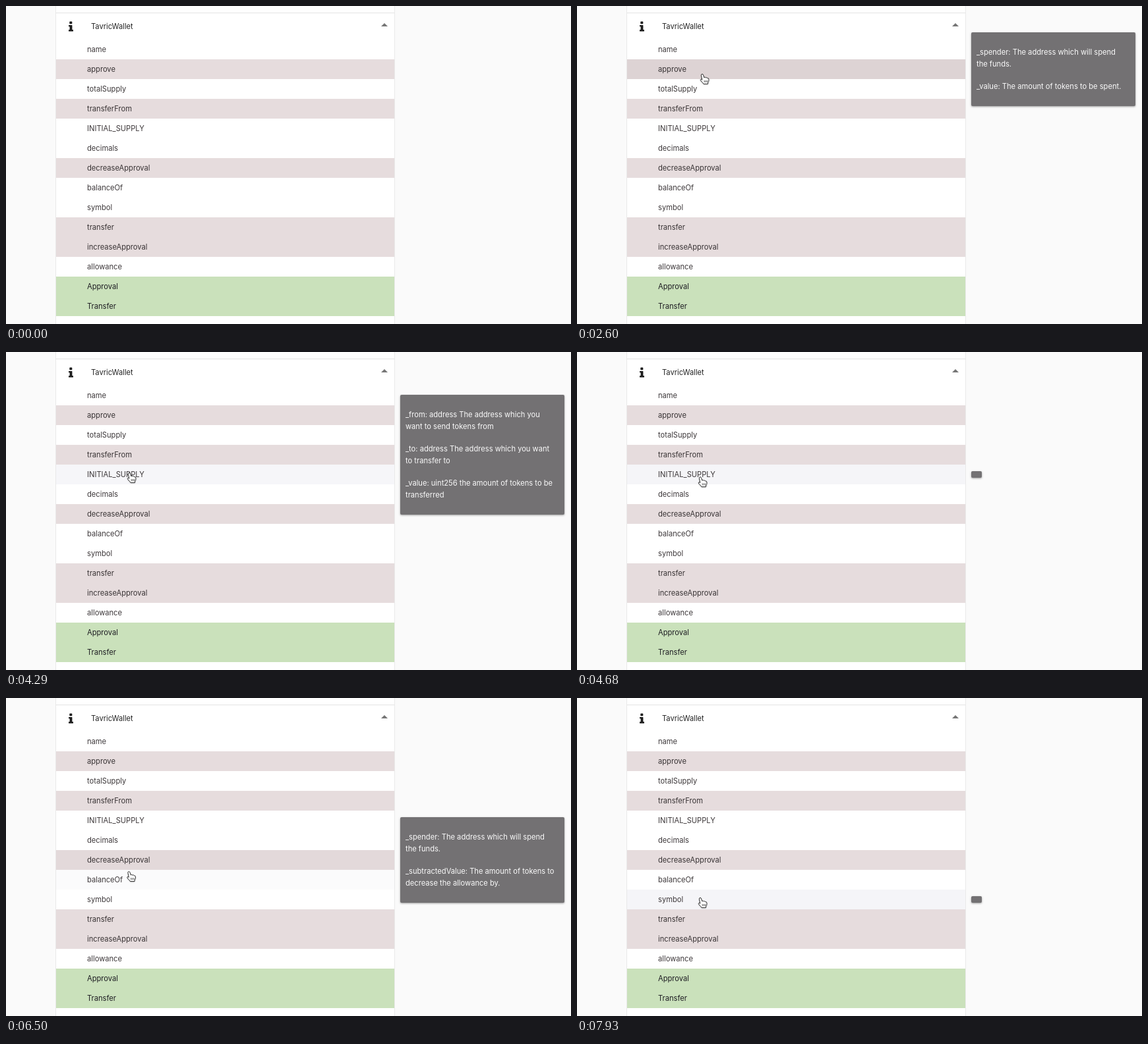
Recreate the animation shown at these times as an HTML page with a canvas. Size 857 by 483 pixels, loop 8 s.

```html
<!DOCTYPE html>
<html lang="en">
<head>
<meta charset="utf-8">
<title>Contract methods</title>
<style>
  html, body { margin: 0; width: 100%; height: 100%; overflow: hidden; background: #fafafa; }
  canvas { display: block; width: 857px; height: 483px; filter: blur(.35px); }
</style>
</head>
<body>
<canvas id="stage"></canvas>
<script>
const W = 857, H = 483, LOOP = 8000;
const LEFT = 76, RIGHT = 589, FIRST_ROW = 51, ROW_H = 30;
const FONT = '11.15px Inter, Arial, sans-serif';

const canvas = document.getElementById('stage');
const ctx = canvas.getContext('2d');
const dpr = window.devicePixelRatio || 1;
canvas.width = W * dpr;
canvas.height = H * dpr;

const KINDS = {
  read:  { fill: [255, 255, 255], hover: [245, 245, 248], text: '#3d383a' },
  write: { fill: [230, 220, 221], hover: [221, 211, 212], text: '#383334' },
  event: { fill: [202, 225, 187], hover: [202, 225, 187], text: '#1d1c22' }
};

// Each tip is a list of paragraphs, each paragraph a list of lines.
const SPENDER = ['_spender: The address which will spend', 'the funds.'];
const rows = [
  { name: 'name', kind: 'read', from: 850 },
  { name: 'approve', kind: 'write', from: 1660,
    tip: [SPENDER, ['_value: The amount of tokens to be spent.']] },
  { name: 'totalSupply', kind: 'read', from: 2860, tip: [] },
  { name: 'transferFrom', kind: 'write', from: 3310,
    tip: [['_from: address The address which you', 'want to send tokens from'],
          ['_to: address The address which you want', 'to transfer to'],
          ['_value: uint256 the amount of tokens to be', 'transferred']] },
  { name: 'INITIAL_SUPPLY', kind: 'read', from: 4180 },
  { name: 'decimals', kind: 'read', from: 4940 },
  { name: 'decreaseApproval', kind: 'write', from: 5660,
    tip: [SPENDER, ['_subtractedValue: The amount of tokens to', 'decrease the allowance by.']] },
  { name: 'balanceOf', kind: 'read', from: 6450,
    tip: [['_owner: The address to query the the', 'balance of.'],
          ['Returns: An uint256 representing the', 'amount owned by the passed address.']] },
  { name: 'symbol', kind: 'read', from: 7380 },
  { name: 'transfer', kind: 'write' },
  { name: 'increaseApproval', kind: 'write' },
  { name: 'allowance', kind: 'read' },
  { name: 'Approval', kind: 'event' },
  { name: 'Transfer', kind: 'event' }
];

// Pointer path: time, fingertip x, fingertip y.
const path = [
  [390, 190, -25], [910, 191, 57], [1300, 191, 62], [1430, 191, 62],
  [1820, 191, 97], [2600, 191, 103], [2990, 191, 123], [3200, 191, 128],
  [3380, 191, 153], [3950, 190, 161], [4290, 188, 183], [4650, 188, 189],
  [5050, 188, 213], [5460, 188, 215], [5850, 187, 243], [6250, 187, 250],
  [6760, 188, 277], [7150, 188, 277], [7800, 188, 303], [8000, 188, 303]
];

const clamp = v => Math.max(0, Math.min(1, v));
const ease = v => { v = clamp(v); return v * v * (3 - 2 * v); };
const mix = (a, b, k) => a + (b - a) * k;
const rgb = (a, b, k) => `rgb(${a.map((v, i) => Math.round(mix(v, b[i], k))).join(',')})`;

function box(x, y, w, h, color) {
  ctx.fillStyle = color;
  ctx.fillRect(x, y, w, h);
}

function label(text, x, y, color) {
  ctx.fillStyle = color;
  ctx.fillText(text, x, y);
}

function drawHeader() {
  box(LEFT, 0, RIGHT - LEFT, H, '#fff');
  box(LEFT, 10, RIGHT - LEFT, 1, '#e4e4e4');

  ctx.fillStyle = '#1c1c1c';
  ctx.beginPath();
  ctx.roundRect(96.3, 23.4, 4, 3.8, .8);
  ctx.roundRect(95, 29, 5.4, 2.3, .6);
  ctx.roundRect(96.6, 29, 3.8, 9, .4);
  ctx.roundRect(95, 36, 7, 2.5, .6);
  ctx.fill();

  label('TavricWallet', 129, 35, '#242424');

  ctx.fillStyle = '#757575';
  ctx.beginPath();
  ctx.moveTo(569, 31);
  ctx.lineTo(574, 26);
  ctx.lineTo(579, 31);
  ctx.fill();
}

function drawRow(row, i, t) {
  const kind = KINDS[row.kind], y = FIRST_ROW + i * ROW_H;
  const next = rows[i + 1]?.from ?? Infinity;
  const glow = row.from ? clamp((t - row.from) / 130) * (1 - clamp((t - next) / 80)) : 0;
  box(LEFT, y, RIGHT - LEFT, ROW_H, rgb(kind.fill, kind.hover, glow));
  label(row.name, 123, y + 19, kind.text);
}

function drawTip(row, i, t) {
  if (!row.from) return;
  const leave = (rows[i + 1].from ?? Infinity) + 200;
  const grow = ease((t - row.from - 250) / 150) * (1 - ease((t - leave) / 90));
  if (grow <= 0) return;

  const paragraphs = row.tip || [];
  const lines = paragraphs.flat().length;
  const w = lines ? 249 : 16;
  const h = lines ? 42 + lines * 18 + (paragraphs.length - 1) * 16 : row.tip ? 26 : 10;

  ctx.save();
  ctx.translate(598, FIRST_ROW + (i + .5) * ROW_H);
  ctx.scale(grow, grow);
  ctx.globalAlpha = grow;
  ctx.save();
  ctx.shadowColor = 'rgba(0,0,0,.38)';
  ctx.shadowBlur = 3 * dpr;
  ctx.shadowOffsetY = dpr;
  ctx.fillStyle = '#737173';
  ctx.beginPath();
  ctx.roundRect(0, -h / 2, w, h, 2);
  ctx.fill();
  ctx.restore();

  let y = -h / 2 + 33.5;
  for (const paragraph of paragraphs) {
    for (const line of paragraph) {
      label(line, 8, y, '#fafafa');
      y += 18;
    }
    y += 16;
  }
  ctx.restore();
}

function drawHand(t) {
  if (t < path[0][0]) return;
  const n = path.findIndex(p => p[0] > t);
  const a = path[n - 1], b = path[n];
  const k = ease((t - a[0]) / (b[0] - a[0]));

  ctx.save();
  ctx.translate(mix(a[1], b[1], k), mix(a[2], b[2], k));
  ctx.beginPath();
  ctx.moveTo(-1.2, 9.2);
  ctx.lineTo(-2.6, 2.2);
  ctx.quadraticCurveTo(-2.6, .4, -1, .4);
  ctx.quadraticCurveTo(.2, .4, .7, 2.2);
  ctx.lineTo(1.7, 5.6);
  ctx.quadraticCurveTo(3.4, 4.4, 4.4, 5.9);
  ctx.quadraticCurveTo(6, 5, 6.8, 6.6);
  ctx.quadraticCurveTo(8.8, 6.2, 9, 8.6);
  ctx.quadraticCurveTo(9.2, 11.3, 7.7, 13.4);
  ctx.lineTo(7.5, 15.4);
  ctx.lineTo(1, 15.4);
  ctx.quadraticCurveTo(0, 13.6, -2.8, 11);
  ctx.quadraticCurveTo(-4.4, 9.2, -3.3, 8.4);
  ctx.quadraticCurveTo(-2.4, 7.9, -1.2, 9.2);
  ctx.closePath();
  ctx.fillStyle = '#fff';
  ctx.strokeStyle = '#2a2a2a';
  ctx.lineWidth = 1;
  ctx.lineJoin = 'round';
  ctx.shadowColor = 'rgba(0,0,0,.25)';
  ctx.shadowBlur = 2 * dpr;
  ctx.shadowOffsetY = dpr;
  ctx.fill();
  ctx.shadowColor = 'transparent';
  ctx.stroke();
  ctx.lineWidth = .8;
  ctx.beginPath();
  for (const x of [2.2, 4.3, 6.4]) {
    ctx.moveTo(x, 10);
    ctx.lineTo(x + .1, 13);
  }
  ctx.stroke();
  ctx.restore();
}

function draw(t) {
  ctx.setTransform(dpr, 0, 0, dpr, 0, 0);
  ctx.font = FONT;
  box(0, 0, W, H, '#fafafa');
  drawHeader();
  rows.forEach((row, i) => drawRow(row, i, t));
  box(LEFT - 1, 0, 1, H, '#e9e9e9');
  box(RIGHT, 0, 1, H, '#e9e9e9');
  rows.forEach((row, i) => drawTip(row, i, t));
  drawHand(t);
}

const start = performance.now();
function tick() {
  draw((performance.now() - start) % LOOP);
  requestAnimationFrame(tick);
}
tick();
</script>
</body>
</html>
```
